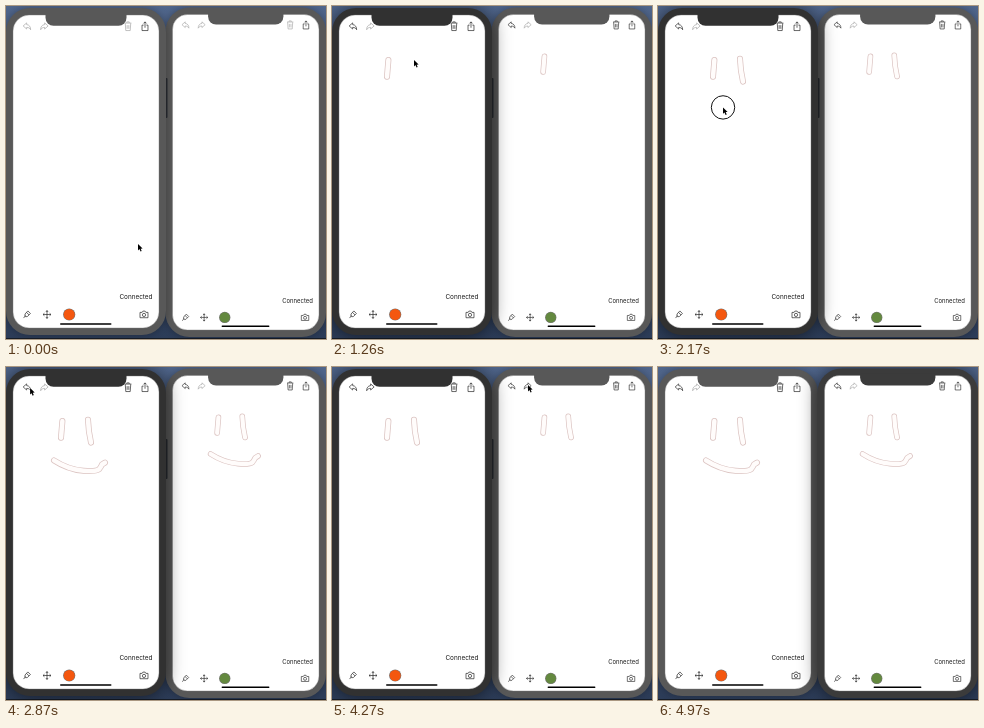
Animation, 320 px wide and 333 px high, one loop 5.32 s. Source, as an HTML page with a canvas:

```html
<!DOCTYPE html>
<html lang="en">
<head>
<meta charset="utf-8">
<title>Shared drawing</title>
<style>
html, body { margin: 0; width: 100%; height: 100%; overflow: hidden; background: #26344f; }
canvas { display: block; width: 320px; height: 333px; }
</style>
</head>
<body>
<canvas id="stage"></canvas>
<script>
const LOOP = 5320, STEP = 70, SYNC = 140, BEZEL = 7;
const canvas = document.getElementById('stage');
const ctx = canvas.getContext('2d');
const ratio = window.devicePixelRatio || 1;
canvas.width = 320 * ratio;
canvas.height = 333 * ratio;

// Screen rectangles; both phones share one layout at different scales
const phones = [
  { x: 7, y: 9, w: 146, h: 313, scale: 1, color: '#f4570f' },
  { x: 166.5, y: 8.5, w: 146.5, h: 315.5, scale: .93, color: '#64893f' }
];

const strokes = ['M56.4 54L55 70.8', 'M82 52.8Q82.4 64 85 75.6',
  'M48 93.4Q62 102.5 77.5 103.8Q90 104.8 93 102.3Q95 100 96 97.5L99 95.6'];

// What the pointer does, in order: glides ease out, presses show a ring
const legs = [
  { from: 0, to: 490, d: 'M132 238C160 110 150 -80 56.4 54' },
  { from: 700, to: 1120, d: strokes[0], press: true },
  { from: 1120, to: 1260, d: 'M55 70.8L82 54' },
  { from: 1330, to: 1610, d: strokes[1], press: true },
  { from: 1610, to: 2030, d: 'M85 76Q84 106 48 93.4' },
  { from: 2100, to: 2310, d: strokes[2], press: true },
  { from: 2310, to: 2940, d: 'M99 95.6L24 21' },
  { from: 3080, to: 3290, d: 'M24 21h.1', press: true },
  { from: 3290, to: 4270, d: 'M24 21Q120 75 196 18' },
  { from: 4410, to: 4550, d: 'M196 18h.1', press: true },
  { from: 4550, to: 4900, d: 'M196 18L162 301' }
];
for (const leg of legs) {
  leg.path = document.createElementNS('http://www.w3.org/2000/svg', 'path');
  leg.path.setAttribute('d', leg.d);
  leg.length = leg.path.getTotalLength();
}
const [draw1, draw2, draw3, undo, redo] = legs.filter(leg => leg.press).map(leg => leg.to);
const ACTIVATE_LEFT = 770, ACTIVATE_RIGHT = 4410, POINTER_GONE = 4970;

const icons = {
  undo: 'M-4.5 -.4L-.4 -4V-2C2.8 -1.8 4.3 .8 4.3 4C3 2 1.8 1.3 -.4 1.3V3.2Z',
  trash: 'M-4 -3.8H4M-1.4 -4V-5.2H1.4V-4M-3.2 -3.5L-2.6 5H2.6L3.2 -3.5M-1 -1.4V3M1 -1.4V3',
  share: 'M-1.6 -1.4H-3.5V5H3.5V-1.4H1.6M0 1.7V-5.2M-1.8 -3.4L0 -5.2L1.8 -3.4',
  pen: 'M-4 4.2L-1.8 1.2M-2.3 -.6L1 -4.2L4 -1.2L.5 2.4L-1.5 2.6L-2.4 1.8ZM-.5 -2.5L2.3 .5',
  move: 'M-4.5 0H4.5M0 -4.5V4.5M-3 -1.5L-4.7 0L-3 1.5M3 -1.5L4.7 0L3 1.5M-1.2 -3L0 -4.7L1.2 -3M-1.2 3L0 4.7L1.2 3',
  camera: 'M-4.7 -2.5H-2.2L-1.3 -4H1.3L2.2 -2.5H4.7V3.8H-4.7ZM1.9 .5A1.9 1.9 0 1 1 -1.9 .5A1.9 1.9 0 1 1 1.9 .5'
};
for (const name in icons) icons[name] = new Path2D(icons[name]);
const arrow = new Path2D('M0 0V7.8L1.8 6.2L3.1 9.2L4.5 8.5L3.2 5.7L5.6 5.5Z');

const clamp = k => Math.min(1, Math.max(0, k));

// Runs a drawing in its own moved and scaled coordinates
function at(x, y, sx, sy, draw) {
  ctx.save();
  ctx.translate(x, y);
  ctx.scale(sx, sy);
  draw();
  ctx.restore();
}

function roundRect(x, y, w, h, r, fill) {
  ctx.beginPath();
  ctx.roundRect(x, y, w, h, r);
  ctx.fillStyle = fill;
  ctx.fill();
}

function disc(x, y, r, fill) {
  roundRect(x - r, y - r, 2 * r, 2 * r, r, fill);
}

function icon(name, x, y, enabled = true, flip = 1) {
  at(x, y, .85 * flip, .85, () => {
    ctx.lineWidth = .8;
    ctx.strokeStyle = enabled ? '#222' : '#a4a4a4';
    ctx.stroke(icons[name]);
  });
}

function drawBackground() {
  const sky = ctx.createLinearGradient(0, 0, 0, 333);
  sky.addColorStop(0, '#50668c');
  sky.addColorStop(1, '#2c3c58');
  ctx.fillStyle = sky;
  ctx.fillRect(0, 0, 320, 333);
  ctx.fillStyle = '#161c26';
  ctx.fillRect(0, 332, 320, 1);
}

function drawBody({ x, y, w, h, scale }, bezel, active) {
  ctx.save();
  ctx.shadowColor = active ? 'rgba(0,0,0,.6)' : 'rgba(0,0,0,.3)';
  ctx.shadowBlur = (active ? 18 : 8) * ratio;
  roundRect(x - BEZEL, y - BEZEL, w + 2 * BEZEL, h + 2 * BEZEL, 24, bezel);
  ctx.restore();

  roundRect(x, y, w, h, 16 * scale, '#fff');
  ctx.lineWidth = .8;
  ctx.strokeStyle = 'rgba(120,120,120,.5)';
  ctx.stroke();

  const half = 40.5 * scale;
  roundRect(x + w / 2 - half, y - 2, 2 * half, 2 + 10.8 * scale, [0, 0, 8, 8], bezel);
}

function drawArt(t, lag, smileHidden) {
  ctx.lineCap = ctx.lineJoin = 'round';
  [draw1, draw2, draw3].forEach((done, i) => {
    if (t < done + lag || i === 2 && smileHidden) return;
    const path = new Path2D(strokes[i]);
    for (const [width, color] of [[6, '#dbc3c1'], [4.5, '#fffcfb']]) {
      ctx.lineWidth = width;
      ctx.strokeStyle = color;
      ctx.stroke(path);
    }
  });
}

function drawPhone(index, t, active) {
  const p = phones[index];
  const { scale } = p;
  const bezel = active === index ? (index ? '#3b3b3b' : '#313131') : '#585858';
  const leftLag = index ? SYNC : 0, rightLag = SYNC - leftLag;
  const redone = t >= redo + rightLag;
  const smileHidden = t >= undo + leftLag && !redone;
  const canRedo = t >= undo + 3 * leftLag && !redone;
  const hasArt = t >= draw1 + leftLag;

  if (!index) roundRect(159, 72, 2.5, 40, 1, '#272a30');
  drawBody(p, bezel, active === index);

  at(p.x, p.y, scale, scale, () => {
    const right = p.w / scale, bottom = p.h / scale;
    const topBar = 11.3, toolBar = bottom - 13.5;
    icon('undo', 14, topBar, hasArt);
    icon('undo', 31.3, topBar, canRedo, -1);
    icon('trash', right - 31, topBar, hasArt);
    icon('share', right - 14, topBar);
    icon('pen', 14, toolBar);
    icon('move', 34, toolBar);
    icon('camera', right - 15, toolBar);
    disc(56.2, toolBar, 6.1, '#777');
    disc(56.2, toolBar, 5.5, p.color);
    roundRect(right / 2 - 26, bottom - 4.8, 51.5, 1.6, .8, '#000');

    ctx.font = '6.4px Inter, sans-serif';
    ctx.textAlign = 'right';
    ctx.fillStyle = '#1c1c1c';
    ctx.fillText('Connected', right - 6.5, bottom - 29);
    at(-phones[0].x, -phones[0].y, 1, 1, () => drawArt(t, leftLag, smileHidden));
  });
}

function drawPointer(t) {
  if (t >= POINTER_GONE) return;
  const leg = legs.findLast(leg => leg.from <= t);
  const k = clamp((t - leg.from) / (leg.to - leg.from));
  const eased = leg.press ? k : 1 - (1 - k) ** 3;
  const { x, y } = leg.path.getPointAtLength(eased * leg.length);
  if (leg.press && t < leg.to) {
    ctx.beginPath();
    ctx.arc(x, y, 11.7, 0, 7);
    ctx.lineWidth = 1;
    ctx.strokeStyle = '#111';
    ctx.stroke();
  }
  at(x, y, .82, .82, () => {
    ctx.lineWidth = 1;
    ctx.strokeStyle = '#fff';
    ctx.stroke(arrow);
    ctx.fillStyle = '#000';
    ctx.fill(arrow);
  });
}

function render(now) {
  const t = Math.floor(now % LOOP / STEP) * STEP;
  const active = t > ACTIVATE_RIGHT - STEP ? 1 : t >= ACTIVATE_LEFT ? 0 : -1;
  const order = active === 1 ? [0, 1] : [1, 0];
  ctx.setTransform(ratio, 0, 0, ratio, 0, 0);
  drawBackground();
  for (const index of order) drawPhone(index, t, active);
  drawPointer(t);
}

const start = performance.now();
function loop() {
  render(performance.now() - start);
  requestAnimationFrame(loop);
}
loop();
</script>
</body>
</html>
```
